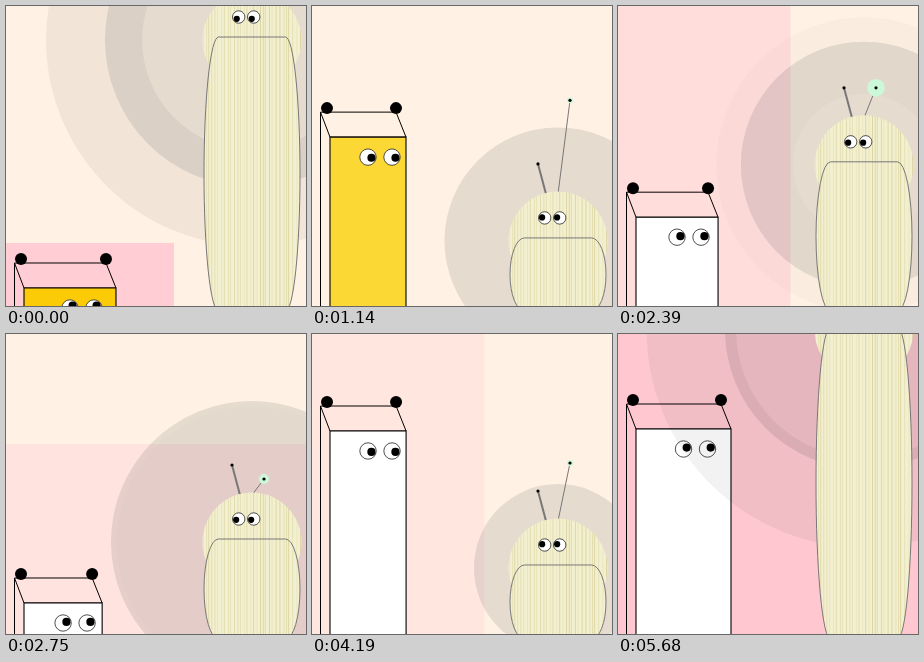
An HTML page with a canvas for the animation above (5740 ms loop, 300 by 300 pixels).

```html
<!DOCTYPE html>
<html lang="en">
<head>
<meta charset="utf-8">
<title>Two characters</title>
<style>
  html, body { margin: 0; width: 100%; height: 100%; overflow: hidden; background: #fff1e3; }
  canvas { display: block; width: 100vw; height: 100vh; }
</style>
</head>
<body>
<canvas id="stage" width="300" height="300"></canvas>
<script>
const ctx = document.getElementById('stage').getContext('2d');
const LOOP = 5740;
const QUIET = 232, LOUD = -7;
const WORM_X = 246, WORM_BOTTOM = 305;

// Keys are [time, value] pairs, eased between neighbours.
const wormTop = [[0, 31], [330, 190], [600, 231], [1250, 232], [1560, 40], [1850, 37],
  [2300, 150], [2750, 205], [3150, 231], [4190, 231], [4890, 42], [5590, -5], [5680, -7]];
const boxTop = [[0, 257], [700, 40], [1300, 120], [1850, 79], [2750, 244], [3500, 68],
  [4190, 72], [4890, 192], [5590, 72], [5680, 70]];
const discRadius = [[0, 147], [700, 125], [1850, 90], [2750, 141], [4190, 84], [4890, 114],
  [5590, 138], [5680, 139]];
const feelerLength = [[0, 110], [700, 156], [1850, 100], [2750, 60], [4190, 102], [5680, 110]];
const panelWidth = [[0, 168], [180, 165]];
const panelHeight = [[0, 63], [180, 0]];

// [start, x, y, width, height]
const panels = [[1400, 0, 0, 172.5, 300], [2650, 0, 110, 300, 190], [3910, 0, 0, 172.5, 300],
  [4540, 0, 110, 300, 190], [5150, 0, 0, 300, 300]];

function at(keys, t) {
  const next = keys.findIndex(k => k[0] > t);
  if (next < 0) return keys[keys.length - 1][1];
  const [t0, v0] = keys[next - 1], [t1, v1] = keys[next];
  const p = (t - t0) / (t1 - t0);
  return v0 + (v1 - v0) * p * p * (3 - 2 * p);
}

const mix = (from, to, p) => `rgb(${from.map((v, i) => v + (to[i] - v) * p).join(',')})`;

function circle(x, y, r, fill, stroke, width = 1) {
  ctx.beginPath();
  ctx.arc(x, y, Math.max(r, 0), 0, Math.PI * 2);
  paint(fill, stroke, width);
}

function path(points, fill, stroke, width = 1) {
  ctx.beginPath();
  points.forEach(([x, y]) => ctx.lineTo(x, y));
  paint(fill, stroke, width);
}

function paint(fill, stroke, width) {
  if (fill) { ctx.fillStyle = fill; ctx.fill(); }
  if (stroke) { ctx.strokeStyle = stroke; ctx.lineWidth = width; ctx.stroke(); }
}

function eyes(x, y, gap, r, targetX, targetY) {
  const angle = Math.atan2((targetY - y) * 0.55, targetX - x);
  const reach = r * 0.43;
  for (const ex of [x, x + gap]) {
    circle(ex, y, r, '#fff', '#222', 0.8);
    circle(ex + Math.cos(angle) * reach, y + Math.sin(angle) * reach, r * 0.5, '#000');
  }
}

function makeStripes() {
  const tile = document.createElement('canvas');
  tile.width = 300;
  tile.height = 1;
  const g = tile.getContext('2d');
  g.fillStyle = '#f3f0d1';
  g.fillRect(0, 0, 300, 1);
  let seed = 11;
  const random = () => (seed = seed * 16807 % 2147483647) / 2147483647;
  for (let x = 197; x < 297; x += 2 + random() * 2.5) {
    g.fillStyle = `rgba(205,196,130,${0.2 + random() * 0.4})`;
    g.fillRect(x, 0, 1, 1);
  }
  return ctx.createPattern(tile, 'repeat');
}
const stripes = makeStripes();

function drawPanel(t, loudness) {
  ctx.fillStyle = mix([255, 231, 224], [255, 200, 208], loudness);
  const panel = panels.filter(p => p[0] <= t).pop();
  if (panel) ctx.fillRect(...panel.slice(1));
  else if (t < 180) {
    const h = at(panelHeight, t);
    ctx.fillRect(0, 300 - h, at(panelWidth, t), h);
  }
}

function drawBox(t, top, loudness, wormEyeY) {
  const width = 76 + 19 * loudness;
  const right = 18 + width, front = top + 25;
  const face = t < 1400 ? mix([252, 216, 53], [251, 201, 0], loudness) : '#fff';
  path([[8.5, 310], [8.5, top], [right - 10, top], [right, front], [18, front], [8.5, top]], null, '#000');
  path([[18, 310], [18, front], [right, front], [right, 310]], face, '#000', 1.1);
  circle(15, top - 4, 6, '#000');
  circle(right - 10, top - 4, 6, '#000');
  eyes(18 + width / 2, front + 20, 24, 8.2, 240, wormEyeY);
}

function drawHalo(t, top, loudness) {
  const y = top + 3, r = at(discRadius, t);
  circle(WORM_X, y, r, 'rgba(20,30,45,.105)');
  const ringWidth = 50 + (r - 90) * 0.81;
  const ringAlpha = 0.052 * Math.min(1, loudness * 1.25);
  circle(WORM_X, y, 170 - 0.39 * top, null, `rgba(10,15,20,${ringAlpha})`, ringWidth);
}

function drawWorm(t, top, boxEyeX, boxEyeY) {
  const tipY = top - at(feelerLength, t);
  path([[234, top - 44], [226, top - 74]], null, '#777', 2);
  circle(226, top - 74, 1.6, '#000');
  path([[246, top - 44], [258, tipY]], null, '#777');
  circle(258, tipY, 3 + Math.max(0, (QUIET - top) / 13), '#cdf7d9');
  circle(258, tipY, 1.6, '#000');

  circle(WORM_X, top + 3, 49.5, stripes);
  const half = (WORM_BOTTOM - top) / 2;
  ctx.beginPath();
  ctx.roundRect(198, top, 96, half * 2, [{ x: 14.5, y: half }]);
  paint(stripes, '#777', 1);
  eyes(232.7, top - 20, 15, 6.2, boxEyeX, boxEyeY);
}

function draw(now) {
  const t = now % LOOP;
  const top = at(wormTop, t), box = at(boxTop, t);
  const loudness = (QUIET - top) / (QUIET - LOUD);
  ctx.fillStyle = '#fff1e3';
  ctx.fillRect(0, 0, 300, 300);
  drawPanel(t, loudness);
  drawBox(t, box, loudness, top - 20);
  drawHalo(t, top, loudness);
  drawWorm(t, top, 65, box + 45);
}

const start = performance.now();
function tick() {
  draw(performance.now() - start);
  requestAnimationFrame(tick);
}
tick();
</script>
</body>
</html>
```
